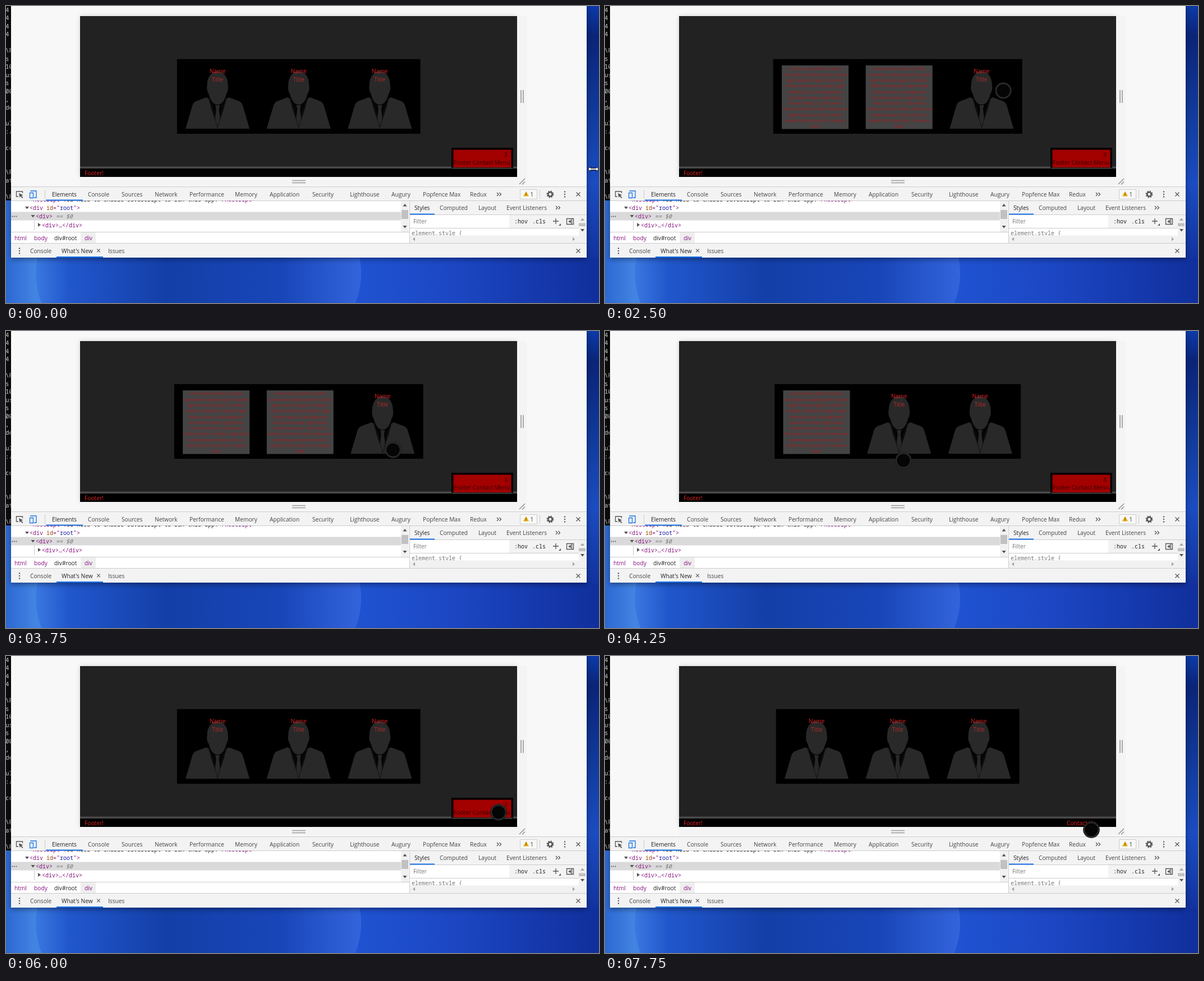
These frames come from a looping animation (1057x530 px, 8 s). An HTML page:

```html
<!DOCTYPE html>
<html lang="en">
<head>
<meta charset="utf-8">
<title>Team cards in device mode</title>
<style>
  html, body { margin: 0; width: 100%; height: 100%; overflow: hidden; background: #1c46c0; }
  svg { display: block; width: 100vw; height: 100vh; }
  text { font: 10.2px "Open Sans", "Noto Sans", sans-serif; fill: #444; white-space: pre; }
  .mono text, text.mono { font: 10px "Noto Sans Mono", "DejaVu Sans Mono", monospace; }
  .term text { font-size: 10.8px; fill: #d0d0d0; }
  .tag { fill: #881280; }
  .attr { fill: #994500; }
  .val { fill: #1a1aa6; }
  .dim { fill: #777; }
  .dark { fill: #222; }
  .red text { fill: #e32222; }
  .mid { text-anchor: middle; }
  .card .title { fill: #b92a2a; }
  .card .lorem { font-size: 7.2px; fill: #ab1a1e; }
  .line { fill: none; stroke: #555; stroke-width: 1.3; }
  .edge { stroke: #ccc; }
  .blue { fill: #1a73e8; }
</style>
</head>
<body>
<svg viewBox="0 0 1057 530" preserveAspectRatio="none">
  <defs>
    <linearGradient id="desk">
      <stop offset="0" stop-color="#2c68d2"/>
      <stop offset=".05" stop-color="#4384e2"/>
      <stop offset=".6" stop-color="#1f52d0"/>
      <stop offset=".75" stop-color="#1c47c4"/>
      <stop offset="1" stop-color="#102f9c"/>
    </linearGradient>
    <linearGradient id="petal">
      <stop offset="0" stop-color="#3a78e0"/>
      <stop offset=".1" stop-color="#2157cc"/>
      <stop offset=".4" stop-color="#133fa8"/>
      <stop offset=".75" stop-color="#1846b8"/>
      <stop offset="1" stop-color="#3364dc"/>
    </linearGradient>
    <linearGradient id="side" x2="0" y2="1">
      <stop offset="0" stop-color="#0c3aa8"/>
      <stop offset=".12" stop-color="#0a2478"/>
      <stop offset=".45" stop-color="#123c9e"/>
      <stop offset=".7" stop-color="#1b4cc0"/>
      <stop offset="1" stop-color="#12339f"/>
    </linearGradient>
    <filter id="soft" x="-5%" y="-10%" width="110%" height="120%"><feGaussianBlur stdDeviation="5"/></filter>
    <clipPath id="termClip"><path d="M0 0H8.5V347H0Z"/></clipPath>
    <clipPath id="domClip"><path d="M9 347.5H704V403H9Z"/></clipPath>
    <clipPath id="cssClip"><path d="M720 397H1020V409H720Z"/></clipPath>
    <g id="cross" class="line"><path d="M-3.5-3.5L3.5 3.5M3.5-3.5L-3.5 3.5"/></g>
    <g id="dots" fill="#555"><circle cy="-4.5" r="1.2"/><circle r="1.2"/><circle cy="4.5" r="1.2"/></g>
    <path id="more" class="line" d="M-4-3L-1 0L-4 3M0.5-3L3.5 0L0.5 3"/>
    <path id="tri" d="M-3.5-2H3.5L0 2.5Z"/>
    <g id="person" fill="#292929">
      <path d="M-57 219L-45 178Q-43 171-36 169L-20 163L-14 166H14L20 163L36 169Q43 171 45 178L57 219Z"/>
      <path d="M-15 166L-12 180L0 218L12 180L15 166Z" fill="#050505"/>
      <path d="M-18.5 142C-19 108 19 108 18.5 142C20 146 18 154 16 156C13 168 8 176 0 176C-8 176-13 168-16 156C-18 154-20 146-18.5 142Z"/>
      <path d="M-4 177H4L2.5 184L5 206L0 217L-5 206L-2.5 184Z"/>
      <path d="M-17 165L-9 183L0 218M17 165L9 183L0 218" fill="none" stroke="#151515"/>
    </g>
  </defs>

  <!-- desktop -->
  <path d="M0 0H1057V530H0Z" fill="url(#desk)"/>
  <ellipse cx="343" cy="477" rx="290" ry="200" fill="url(#petal)"/>
  <path d="M1035 0H1057V450H1035Z" fill="url(#side)"/>
  <path d="M0 0H9V347H0Z" fill="#0c0c0c"/>
  <g id="term" class="mono term" clip-path="url(#termClip)"></g>

  <!-- browser window -->
  <path d="M9 0H1035V452H9Z" opacity=".4" filter="url(#soft)"/>
  <path d="M9 0H1035V449H9Z" fill="#f8f8f8"/>
  <path d="M132 18H911V305H132Z" opacity=".14" filter="url(#soft)"/>
  <path d="M911 18H928V320H132V305H911Z" fill="#f4f4f4"/>
  <path d="M918 150V173M922 150V173M510 311.5H534M510 315.5H534M915 318L925 308M920 318.500L925 313.500" stroke="#9a9a9a" stroke-width="1.7"/>
  <path d="M132 18H911V305H132Z" fill="#222"/>

  <!-- page -->
  <path id="tray"/>
  <g id="cards" class="red"></g>
  <path d="M132 286.500H911V290H132Z" fill="#4a4a4a"/>
  <path d="M132 290H911V305H132Z"/>
  <g class="red">
    <text x="140" y="301.500">Footer!</text>
    <text id="contact" x="823" y="301.500">Contact Us</text>
  </g>
  <g id="menu">
    <path d="M794 253H904V290H794Z"/>
    <path d="M797.500 256.500H900.500V288H797.500Z" fill="#a30000"/>
    <path d="M795 289.500H903" stroke="#555" stroke-width="1.500"/>
    <text x="888.500" y="268.500" style="fill:#300">X</text>
    <text x="798" y="282.500" style="fill:#300">Footer Contact Menu</text>
  </g>

  <!-- devtools toolbar -->
  <path d="M9 322H1035V348H9Z" fill="#f3f3f3"/>
  <path class="edge" d="M9 322.500H1035M9 347.500H1035M69.500 328V344M951.500 328V344"/>
  <path class="blue" d="M71 345.500H137V347.500H71Z"/>
  <path class="line" d="M22 340H18.500V331H29.500V334"/>
  <path d="M23 334L30.500 337.500L27.500 338.500L30.500 342L29 343L26 339.500L24.500 342Z" fill="#555"/>
  <path class="line" d="M44 331V330H54V342H50M42.500 333.500H48.500V342.500H42.500Z" style="stroke:#1a73e8"/>
  <g id="tabs"></g>
  <use href="#more" x="879" y="336"/>
  <path d="M916.500 327.500H946.500V344.500H916.500Z" fill="#f8f8f8" class="edge"/>
  <path d="M927 330.500L932 339.500H922Z" fill="#e8ac13"/>
  <path d="M927 333.500V336.500M927 337.500V338.500" stroke="#543c00"/>
  <text x="934.500" y="339.500">1</text>
  <circle class="line" cx="970" cy="336" r="3.700" style="stroke-width:2.600"/>
  <circle cx="970" cy="336" r="5.500" fill="none" stroke="#555" stroke-width="2" stroke-dasharray="2.200 2.120"/>
  <use href="#dots" x="996" y="336"/>
  <use href="#cross" x="1020" y="336"/>

  <!-- elements -->
  <path d="M9 348H704V403H9Z" fill="#fff"/>
  <path d="M9 367.500H704V382.500H9Z" fill="#dadada"/>
  <path d="M50.500 383V400" stroke="#c8c8c8"/>
  <g class="mono" clip-path="url(#domClip)">
    <text class="tag" x="42" y="348.500">&lt;noscript&gt;<tspan class="dark">You need to enable JavaScript to run this app.</tspan>&lt;/noscript&gt;</text>
    <text class="tag" x="42" y="363.500">&lt;div <tspan class="attr">id</tspan>="<tspan class="val">root</tspan>"&gt;</text>
    <text class="tag" x="53" y="379">&lt;div&gt;<tspan class="dim" font-style="italic"> == $0</tspan></text>
    <text class="tag" x="64" y="395">&lt;div&gt;…&lt;/div&gt;</text>
  </g>
  <g fill="#555">
    <use href="#tri" x="37.500" y="360"/><use href="#tri" x="48" y="375"/>
    <path d="M57 387L62 390.500L57 394Z"/>
    <circle cx="11.500" cy="375.500" r="1"/><circle cx="15" cy="375.500" r="1"/><circle cx="18.500" cy="375.500" r="1"/>
  </g>
  <path d="M704 348H718V403H704Z" fill="#f1f1f1"/>
  <path d="M705 364H717V380H705Z" fill="#c1c1c1"/>
  <path d="M707.500 357.500H714.500L711 353Z" fill="#505050"/>
  <use href="#tri" x="711" y="394" fill="#505050"/>

  <!-- breadcrumbs -->
  <path d="M9 403H719V424H9Z" fill="#fff"/>
  <path d="M133 404H160V423H133Z" fill="#eee"/>
  <text class="tag" x="15" y="417.500">html</text>
  <text class="tag" x="50" y="417.500">body</text>
  <text class="dark" x="86" y="417.500">div#root</text>
  <text class="tag" x="140" y="417.500">div</text>

  <!-- styles -->
  <path d="M719 348H1035V424H719Z" fill="#fff"/>
  <path d="M719 348H1035V372.500H719Z" fill="#f3f3f3"/>
  <path class="edge" d="M719.500 348V424M719 372.500H1035M719 396.500H1021M9 403.500H719"/>
  <path class="blue" d="M720 370.500H764V372.500H720Z"/>
  <use href="#more" x="984" y="360"/>
  <path d="M897 373H1021V396H897Z" fill="#f3f3f3"/>
  <text class="dim" x="726" y="388">Filter</text>
  <g class="mono" font-weight="600"><text class="dark" x="906" y="388">:hov</text><text class="dark" x="938" y="388">.cls</text></g>
  <path class="line" d="M975 384H985M980 379V389M999.500 379.500H1011.500V389.500H999.500ZM1008.500 380V389"/>
  <path d="M989 388V392H985ZM1007 381.500V387.500L1002 384.500Z" fill="#555"/>
  <g clip-path="url(#cssClip)"><text class="mono dim" x="723" y="409" style="fill:#777">element.style {</text></g>
  <path d="M720 409.500H1035V423H720ZM1021 373H1035V409.500H1021Z" fill="#f1f1f1"/>
  <path d="M1021 387.500H1033V393H1021Z" fill="#c1c1c1"/>
  <path d="M729 412.500V419.500L725 416ZM1024 383H1031L1027.500 378.500Z" fill="#a3a3a3"/>
  <path d="M1010 412.500V419.500L1014 416Z" fill="#a3a3a3"/>
  <use href="#tri" x="1027.500" y="400" fill="#505050"/>

  <!-- drawer -->
  <path d="M9 424H1035V449H9Z" fill="#f3f3f3"/>
  <path class="edge" d="M9 423.500H1035"/>
  <path class="blue" d="M90 447H173V449H90Z"/>
  <use href="#dots" x="24" y="437"/>
  <use href="#cross" transform="translate(165 436.500) scale(.8)"/>
  <use href="#cross" x="1020" y="437"/>

  <g id="touch">
    <circle r="14.800" fill="#111"/>
    <circle r="13" fill="#050505" stroke="#282828" stroke-width="2.800"/>
  </g>
  <path id="resize" d="M1037.500 291L1042 286.500V289.500H1052V286.500L1056.500 291L1052 295.500V292.500H1042V295.500Z" fill="#fff" stroke="#000"/>
</svg>
<script>
const el = id => document.getElementById(id);
const label = (x, y, s, cls = '') => `<text x="${x}" y="${y}" class="${cls}">${s}</text>`;
const show = (node, on) => node.setAttribute('visibility', on ? 'inherit' : 'hidden');

const terminal = '4 4 4 4 - \\P s 10 us s 00 , de - ul :/ - cc - - \\P at - \\P';
el('term').innerHTML = terminal.split(' ')
  .map((s, i) => s === '-' ? '' : label(-1, 11 + i * 14.46, s)).join('');

const tabRow = (y, row) => row.map(([x, s, cls]) => label(x, y, s, cls)).join('');
el('tabs').innerHTML = tabRow(339.8, [
  [82, 'Elements', 'dark'], [146, 'Console'], [206, 'Sources'], [265, 'Network'],
  [327, 'Performance'], [408, 'Memory'], [470, 'Application'], [546, 'Security'],
  [613, 'Lighthouse'], [687, 'Augury'], [743, 'Popfence Max'], [827, 'Redux']]);
document.querySelector('svg').insertAdjacentHTML('beforeend',
  tabRow(363.7, [[728, 'Styles', 'dark'], [773, 'Computed'], [842, 'Layout'], [892, 'Event Listeners']]) +
  tabRow(440.8, [[43, 'Console'], [99, "What's New", 'dark'], [182, 'Issues']]));

const lorem = ['Lorem ipsum dolor sit amet,', 'consectetur adipiscing elit. Nullam',
  'eget maximus ligula. Curabitur', 'facilisis vestibulum sapien, eget',
  'lobortis purus. Sed dignissim', 'accumsan neque, eget varius',
  'metus finibus ut. Sed viverra', 'vehicula velit vel mattis. Maecenas',
  'pellentesque tincidunt elit, id', 'mattis tortor lacinia id. Curabitur', 'Back'];
const front = '<use href="#person"/>' + label(0, 120, 'Name', 'mid') + label(0, 134.5, 'Title', 'mid title');
const back = '<path d="M-59.5 106H59.500V219.500H-59.500Z" fill="#444"/>' +
  lorem.map((s, i) => label(0, 114.4 + i * 10.28, s, 'mid lorem')).join('');
el('cards').innerHTML = `<g class="card"><g>${front}</g><g>${back}</g></g>`.repeat(3);
const cards = [...el('cards').children];

// time, touch x, touch y, flipped cards (bit per card)
const steps = [
  [0, 0, 0, 0], [750, 800, 225, 0], [1000, 430, 150, 0], [1250, 393, 138, 1],
  [1500, 405, 140, 1], [1750, 480, 146, 1], [2000, 545, 148, 1], [2250, 560, 149, 3],
  [2500, 710, 151, 3], [2750, 706, 155, 7], [3000, 700, 195, 7], [3250, 690, 233, 7],
  [3500, 736, 222, 7], [3750, 690, 212, 3], [4000, 545, 214, 1], [4250, 532, 231, 1],
  [4500, 430, 210, 1], [4750, 395, 205, 0], [5000, 540, 225, 0], [5250, 790, 270, 0],
  [5500, 900, 284, 0], [5750, 871, 271, 0], [6000, 878, 279, 0], [6750, 886, 270, 0],
  [7000, 891, 266, 0], [7250, 891, 267, 0], [7500, 880, 290, 0], [7750, 867, 310, 0]];

// flipped cards are wider, and the row stays centred
function layout(bits) {
  const widths = cards.map((_, i) => bits >> i & 1 ? 149.6 : 144.6);
  const total = widths[0] + widths[1] + widths[2];
  let x = 521.7 - total / 2;
  const [top, bottom] = bits === 7 ? [97, 225] : [94.7, 228];
  el('tray').setAttribute('d', `M${x} ${top}h${total}V${bottom}H${x}Z`);
  cards.forEach((card, i) => {
    card.setAttribute('transform', `translate(${x + widths[i] / 2} 0)`);
    const flipped = bits >> i & 1;
    show(card.firstChild, !flipped);
    show(card.lastChild, flipped);
    x += widths[i];
  });
}

const start = performance.now();
function draw() {
  const t = Math.max(0, performance.now() - start) % 8000;
  const [, x, y, bits] = steps.findLast(s => s[0] <= t);
  layout(bits);
  show(el('touch'), t >= 750);
  el('touch').setAttribute('transform', `translate(${x} ${y})`);
  show(el('resize'), t < 250);
  show(el('menu'), t < 7250);
  show(el('contact'), t >= 7250);
  requestAnimationFrame(draw);
}
draw();
</script>
</body>
</html>
```
